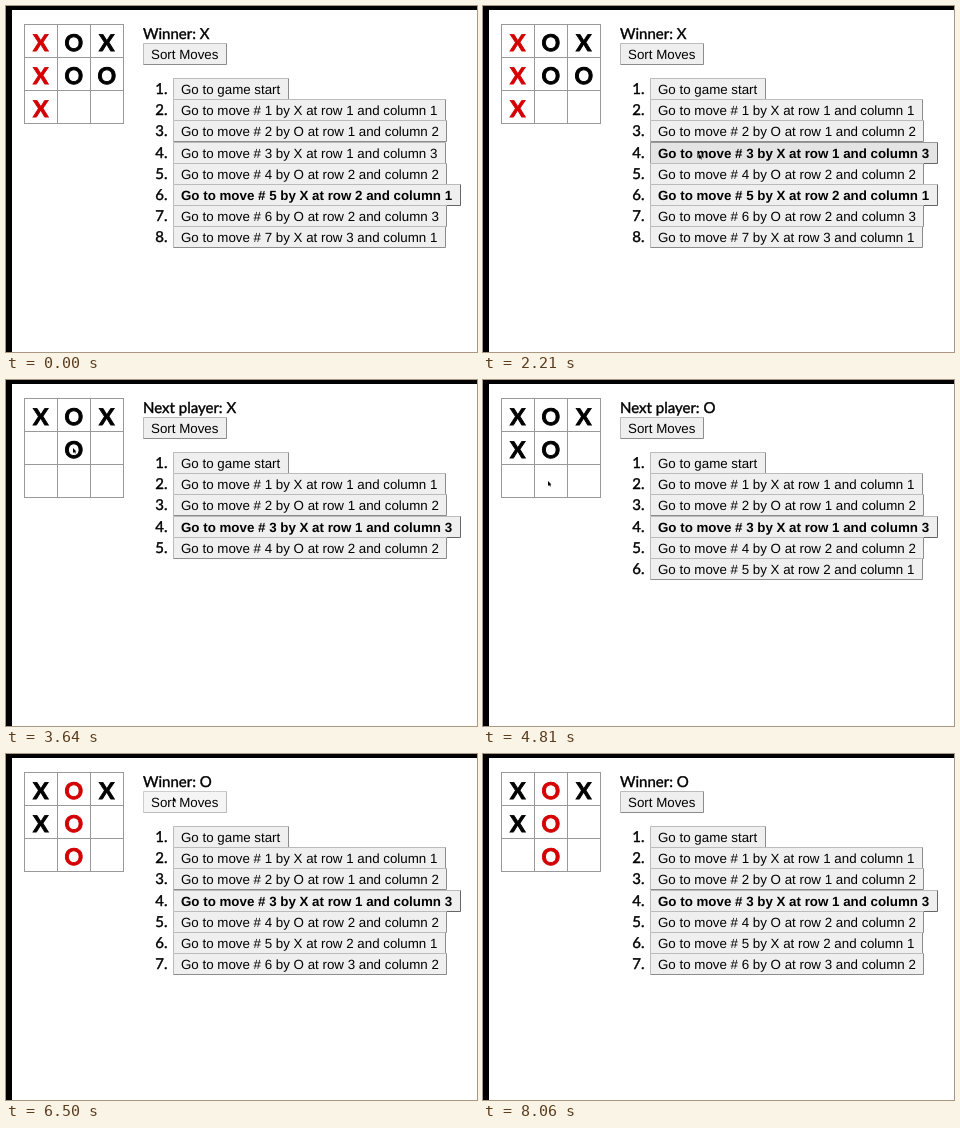
Recreate the animation shown at these times as an HTML page. Size 471x346 px, loop 8320 ms.

```html
<!DOCTYPE html>
<html lang="en">
<head>
<meta charset="utf-8">
<title>Tic-tac-toe history</title>
<style>
  html, body { margin: 0; width: 100%; height: 100%; overflow: hidden; background: #fff; }
  svg { display: block; width: 471px; height: 346px; }
  text { white-space: pre; text-rendering: geometricPrecision; }
  .label { font: 15px Lato, sans-serif; stroke: #000; stroke-width: .4px; }
  .mark { font: bold 23px Lato, sans-serif; text-anchor: middle; stroke-width: .9px; }
  .button { font: 13.333px "Liberation Sans", Arial, sans-serif; }
  .bold { font-weight: bold; }
  .end { text-anchor: end; }
</style>
</head>
<body>
<svg id="stage" viewBox="0 0 471 346">
  <path d="M0 0H471V4H6V346H0Z"/>
  <path d="M18 18.5H118M18 51.5H118M18 84.5H118M18 117.5H118M18.5 18V118M51.5 18V118M84.5 18V118M117.5 18V118" stroke="#999"/>
  <g id="view"></g>
  <path id="cursor" d="M0 0V5L1.2 4L2 5.6L2.9 5.2L2.2 3.6H3.5Z" stroke="#fff" stroke-width=".8" paint-order="stroke"/>
</svg>
<script>
const LOOP = 8320, STEP = 130;
const view = document.getElementById('view');
const cursor = document.getElementById('cursor');

// Cells in playing order; X always starts.
const firstGame = [0, 1, 2, 4, 3, 5, 6];
const secondGame = [0, 1, 2, 4, 3, 7];
const lines = [[0, 1, 2], [3, 4, 5], [6, 7, 8], [0, 3, 6], [1, 4, 7], [2, 5, 8], [0, 4, 8], [2, 4, 6]];

// Each entry changes part of the state at its time.
const events = [
  { at: 0, moves: firstGame, shown: 7, bold: [5], desc: false, hover: '', firstFill: '' },
  { at: 910, desc: true, hover: 'sort' },
  { at: 1690, desc: false },
  { at: 2210, bold: [3, 5], hover: 3 },
  { at: 2340, bold: [3], shown: 3, firstFill: '#780b0e' },
  { at: 3120, hover: '', firstFill: '' },
  { at: 3640, moves: secondGame.slice(0, 4), shown: 4 },
  { at: 4160, moves: secondGame.slice(0, 5), shown: 5 },
  { at: 4940, moves: secondGame, shown: 6 },
  { at: 6500, hover: 'press' },
  { at: 6630, desc: true, hover: 'sort' },
  { at: 7280, desc: false },
  { at: 7540, hover: '' },
];

// Pointer path: time, x, y
const path = [
  [260, 235, 225], [910, 181, 46], [2080, 181, 46], [2210, 216, 148],
  [2990, 214, 142], [3120, 180, 128], [3640, 67, 68], [3900, 52, 70],
  [4160, 35, 68], [4550, 50, 88], [4810, 65, 101], [5200, 66, 101],
  [5590, 98, 98], [5850, 112, 88], [6500, 167, 43], [7410, 167, 43], [8060, 256, 340],
];

const player = n => n % 2 ? 'O' : 'X';

const text = (x, y, content, cls, color = '#000') =>
  `<text x="${x}" y="${y}" class="${cls}" fill="${color}">${content}</text>`;

function measure(content, bold) {
  const probe = measure.context ||= document.createElement('canvas').getContext('2d');
  probe.font = `${bold ? 'bold ' : ''}13.333px "Liberation Sans", Arial, sans-serif`;
  probe.textRendering = 'geometricPrecision';
  return probe.measureText(content).width;
}

function button(x, y, content, { bold = false, hover = false, press = false } = {}) {
  const right = Math.ceil(x + measure(content, bold) + 16) - .5;
  const left = x + .5, top = y + .5, bottom = y + 21.5;
  const face = press ? '#f5f5f5' : hover ? '#e4e4e4' : '#efefef';
  const light = press ? '#ccc' : hover ? '#999' : '#bbb';
  const dark = press ? '#bbb' : hover || bold ? '#666' : '#8c8c8c';
  return `<rect x="${x}" y="${y}" width="${right + .5 - x}" height="22" fill="${face}"/>
    <path d="M${left} ${bottom}V${top}H${right}" fill="none" stroke="${light}"/>
    <path d="M${left} ${bottom}H${right}V${top}" fill="none" stroke="${dark}"/>` +
    text(x + 8, y + 16, content, bold ? 'button bold' : 'button');
}

function board({ moves, shown, firstFill }) {
  const cells = Array(9).fill('');
  moves.slice(0, shown).forEach((cell, n) => cells[cell] = player(n));
  const win = lines.find(([a, b, c]) => cells[a] && cells[a] === cells[b] && cells[a] === cells[c]) || [];
  const marks = cells.map((mark, i) => {
    const color = win.includes(i) ? '#d40000' : i === 0 && firstFill || '#000';
    const x = 34.7 + i % 3 * 33, y = 44.5 + Math.floor(i / 3) * 33;
    return `<g stroke="${color}">${text(x, y, mark, 'mark', color)}</g>`;
  }).join('');
  const status = win.length ? `Winner: ${cells[win[0]]}` : `Next player: ${player(shown)}`;
  return marks + text(137, 33, status, 'label');
}

function moveList({ moves, bold, desc, hover }) {
  let out = '';
  for (let n = 0; n <= moves.length; n++) {
    const y = 72 + Math.round(21.2 * (desc ? moves.length - n : n));
    const cell = moves[n - 1];
    const content = n
      ? `Go to move # ${n} by ${player(n - 1)} at row ${Math.floor(cell / 3) + 1} and column ${cell % 3 + 1}`
      : 'Go to game start';
    out += text(161.5, y + 16, `${n + 1}.`, 'label end') +
      button(167, y, content, { bold: bold.includes(n), hover: hover === n });
  }
  return out;
}

function moveCursor(t) {
  const next = path.findIndex(point => point[0] > t);
  const visible = next > 0;
  cursor.setAttribute('visibility', visible ? 'visible' : 'hidden');
  if (!visible) return;
  const [t0, x0, y0] = path[next - 1], [t1, x1, y1] = path[next];
  const k = (t - t0) / (t1 - t0);
  cursor.setAttribute('transform', `translate(${x0 + (x1 - x0) * k} ${y0 + (y1 - y0) * k})`);
}

let drawn = -1;
function frame() {
  const t = Math.floor(performance.now() % LOOP / STEP) * STEP;
  const past = events.filter(event => event.at <= t);
  if (drawn !== past.length) {
    const state = Object.assign({}, ...past);
    view.innerHTML = board(state) +
      button(137, 37, 'Sort Moves', { hover: state.hover === 'sort', press: state.hover === 'press' }) +
      moveList(state);
    drawn = past.length;
  }
  moveCursor(t);
  requestAnimationFrame(frame);
}
frame();
</script>
</body>
</html>
```
